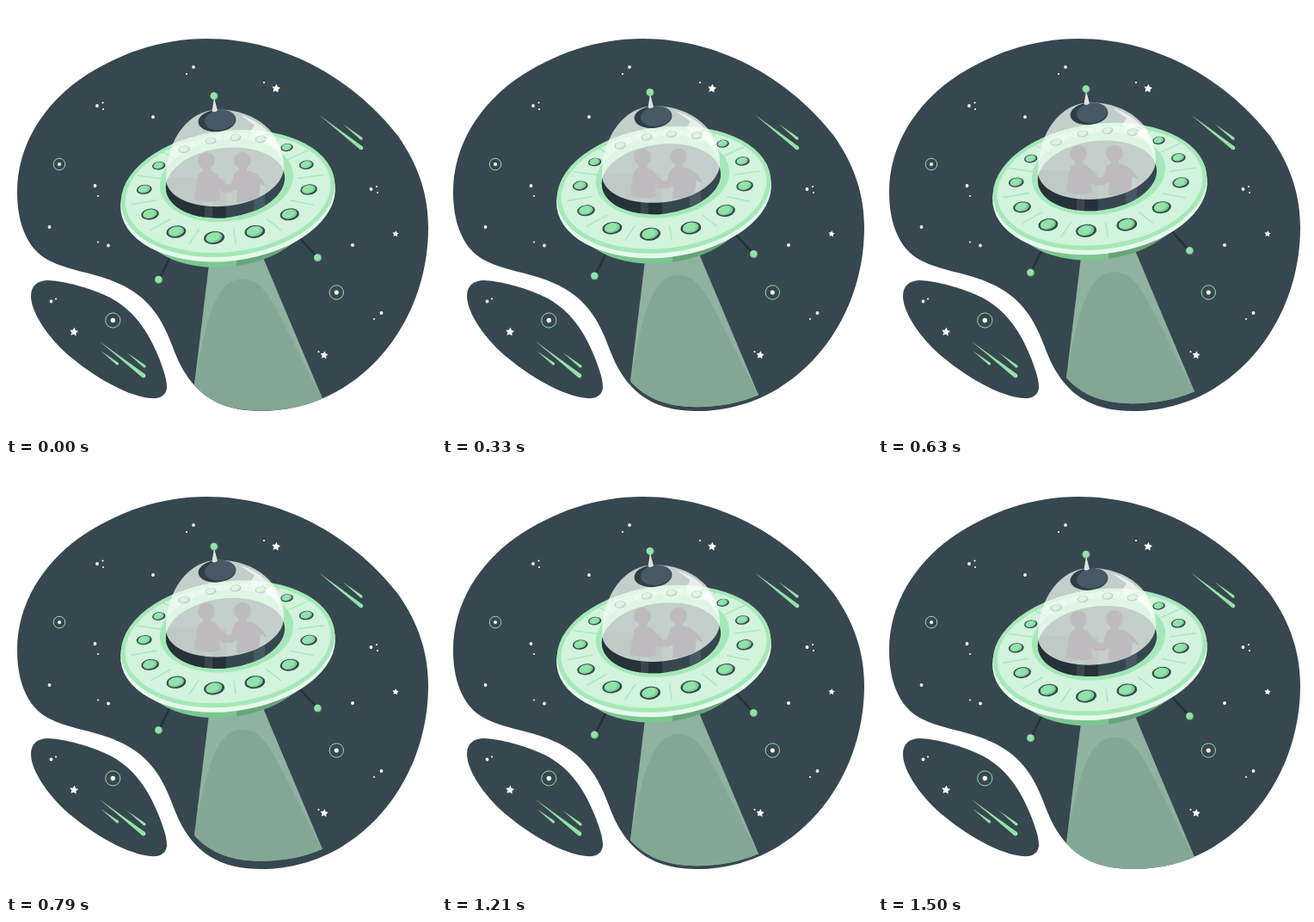
An HTML page that plays this animation: 500x500 px, repeating every 1540 ms.

```html
<!DOCTYPE html>
<html lang="en">
<head>
<meta charset="utf-8">
<title>Flying saucer</title>
<style>
html, body { margin: 0; width: 100%; height: 100%; overflow: hidden; background: #fff; }
svg { display: block; width: 100vw; height: 100vh; }
</style>
</head>
<body>
<svg viewBox="0 0 500 500">
  <defs>
    <clipPath id="baseClip"><ellipse cx="255" cy="206" rx="69.5" ry="40.5" transform="rotate(-7 255 206)"/></clipPath>
    <clipPath id="bellyClip"><path id="belly" d="M158 268C176 293 208 304.500 246 304.500C297 303 338 283 360 247L260 220Z"/></clipPath>
  </defs>
  <g fill="#37474f">
    <path d="M233 38C330 38 409 91 455 150C480 185 491 220 491 258C491 370 410 471 296 471C255 471 232 456 219 441C200 419 197 402 187 380C173 348 152 331 127 321C100 309 70 308 45 293C22 278 13 248 13 217C13 160 45 115 85 86C130 55 180 38 233 38Z"/>
    <path d="M29 337C29 325 37 319 49 319C72 320 100 329 121 339C154 357 168 385 179 412C185 428 187 436 187 444C186 453 179 457 168 456C136 453 92 424 67 401C46 381 29 355 29 337Z"/>
  </g>
  <g id="sky" fill="#fff">
    <g stroke="#fff" stroke-linecap="round">
      <path stroke-width="3.800" d="M218 71h0M106 116h0M171 129h0M103.500 209h0M50.500 257h0M119 278.500h0M424.500 213h0M403 278h0M436.500 357h0M52.500 343.500h0"/>
      <path stroke-width="2.100" d="M210 79h0M112.500 112.500h0m.5 7.500h0M300 89h0M107 221h0M107 274.500h0M431 210h0m1 7h0M428 364h0M363.500 402h0M58 340.500h0"/>
    </g>
  </g>
  <g id="ship">
    <path fill="#8fb2a1" d="M237.300 290L219 441C232 456 255 471 296 471C322 471 347 466 368 457L296 286Z"/>
    <path fill="#82a895" d="M219 441C230 384 240 318 274 318C304 318 309 345 368 457C347 466 322 471 296 471C255 471 232 456 219 441Z"/>
    <path stroke="#263238" stroke-width="2.600" d="M191 292L178 318M342 271L362 293"/>
    <use href="#belly" fill="#7cc692"/>
    <path clip-path="url(#bellyClip)" fill="#66a57a" d="M268 280V310H332L326 262Z"/>
    <g id="disc"></g>
    <g clip-path="url(#baseClip)">
      <path fill="#37474f" d="M180 150H330V255H180Z"/>
      <path fill="#263238" d="M180 200H231V255H180ZM240 200H256V255H240Z"/>
      <path fill="#455a64" d="M288 205H301V255H288Z"/>
    </g>
    <path fill="#f3fbf5" opacity=".75" d="M186 202C186 155 213 121 247 121C291 121 322 149 323 184C326 208 296 229 258 233C218 237 187 223 186 202Z"/>
    <g fill="#bdbbbe">
      <path d="M229 187H238L239 193C247 194 249 204 257 208H270L271 214L251 217L248 213L249 226Q234 231 219 225L222 204Q223 194 229 193Z"/>
      <path d="M271 187H280V192C293 194 298 201 304 212L296 207L294 223Q282 229 268 229L269 211L263 217H250V213L261 209C265 200 264 193 271 192Z"/>
      <circle cx="233" cy="180.500" r="10"/>
      <circle cx="275" cy="180" r="9.800"/>
    </g>
    <path fill="#fff" opacity=".65" d="M272 127C288 132 299 140 306 148L291 152L284 147L289 139ZM309 151C316 160 320 170 321 181Q314 166 300 156Z"/>
    <g id="cap"></g>
    <path fill="#e0e0e0" d="M242 107L239.500 123Q243 125 246 122Z"/>
  </g>
</svg>
<script>
const green = '#92e3a9', ring = '#a5e8b8';
const { sin, cos, PI } = Math;
const get = id => document.getElementById(id);

function add(parent, tag, attrs) {
  const node = document.createElementNS('http://www.w3.org/2000/svg', tag);
  for (const key in attrs) node.setAttribute(key, attrs[key]);
  get(parent).append(node);
}
const dot = (parent, cx, cy, r, fill = '#fff') => add(parent, 'circle', { cx, cy, r, fill });
const oval = (parent, cx, cy, rx, ry, fill, tilt = -7) =>
  add(parent, 'ellipse', { cx, cy, rx, ry, fill, transform: `rotate(${tilt} ${cx} ${cy})` });

function ball(parent, x, y) {
  dot(parent, x, y, 4.5, '#6fb886');
  dot(parent, x - .4, y - .5, 3.7, green);
}

function star(x, y, r) {
  const points = Array.from({ length: 10 }, (_, i) => {
    const a = i * PI / 5 - 1.45, d = i % 2 ? r * .52 : r;
    return [x + d * cos(a), y + d * sin(a)];
  });
  add('sky', 'polygon', { points: points.join(' ') });
}

function planet(x, y, r) {
  add('sky', 'circle', { cx: x, cy: y, r, fill: 'none', stroke: green });
  dot('sky', x, y, r * .31);
}

// A tapering tail that falls to the right and ends in a round head
function comet(x, y, length) {
  const a = .665, w = 1.1 + length / 50;
  const dx = w * sin(a), dy = w * cos(a);
  const tail = `${x - length * cos(a)} ${y - length * sin(a)}`;
  add('sky', 'path', { fill: green, d: `M${tail}L${x + dx} ${y - dy}L${x - dx} ${y + dy}Z` });
  dot('sky', x, y, w, green);
}

star(314, 96, 5.2);
star(453, 265, 3.8);
star(370, 406, 4.8);
star(79, 379, 5.2);
planet(62, 184, 6.8);
planet(124.3, 365.5, 8.6);
planet(384.3, 333, 8.2);
comet(413, 165, 62);
comet(413, 154, 27);
comet(160, 430, 65);
comet(161, 419, 26);
comet(129.5, 416, 24);

oval('disc', 258, 223.5, 125.5, 73.5, '#e6faec');
oval('disc', 258, 218.5, 125, 73, ring);
oval('disc', 258, 218, 120, 68.5, '#d2f3dc');
oval('disc', 256.5, 203.5, 78, 47.5, ring);

// Portholes sit evenly on the rim; perspective spreads the near ones apart
const ports = 14;
const rimAngle = i => {
  const u = 1.688 - i * 2 * PI / ports;
  return u + .026 - .22 * cos(u) + .061 * sin(2 * u);
};
const rim = (a, k = 1) => [257 + 97 * k * cos(a), 211.8 + k * (57.5 * sin(a) - 9.3 * cos(a))];

for (let i = 0; i < ports; i++) {
  const a = rimAngle(i), seam = rimAngle(i + .5);
  const [x, y] = rim(a), r = 9.3 + 2.8 * sin(a);
  add('disc', 'path', { d: `M${rim(seam, .85)}L${rim(seam, 1.16)}`, stroke: ring, 'stroke-width': 1.3 });
  oval('disc', x, y, r, r * .62, '#37474f');
  oval('disc', x - .2, y - .4, r * .81, r * .5, '#7bd095', -12);
  oval('disc', x - r * .12, y - r * .07, r * .65, r * .41, green, -16);
}

oval('cap', 245.5, 134, 22, 12.8, '#2f3e46', -5);
oval('cap', 249, 133, 18, 11.5, '#455a64', -8);
ball('cap', 242, 105.3);
ball('ship', 177.5, 318.8);
ball('ship', 362.5, 293.3);

// Linear bob, 10 units high; the lowest point falls 40 ms before the loop ends
const loop = 1540;
function frame(now) {
  const phase = ((now + 40) % loop) / loop;
  const lift = 10 * (1 - Math.abs(1 - 2 * phase));
  get('ship').setAttribute('transform', `translate(0 ${-lift})`);
  requestAnimationFrame(frame);
}
frame(0);
</script>
</body>
</html>
```
